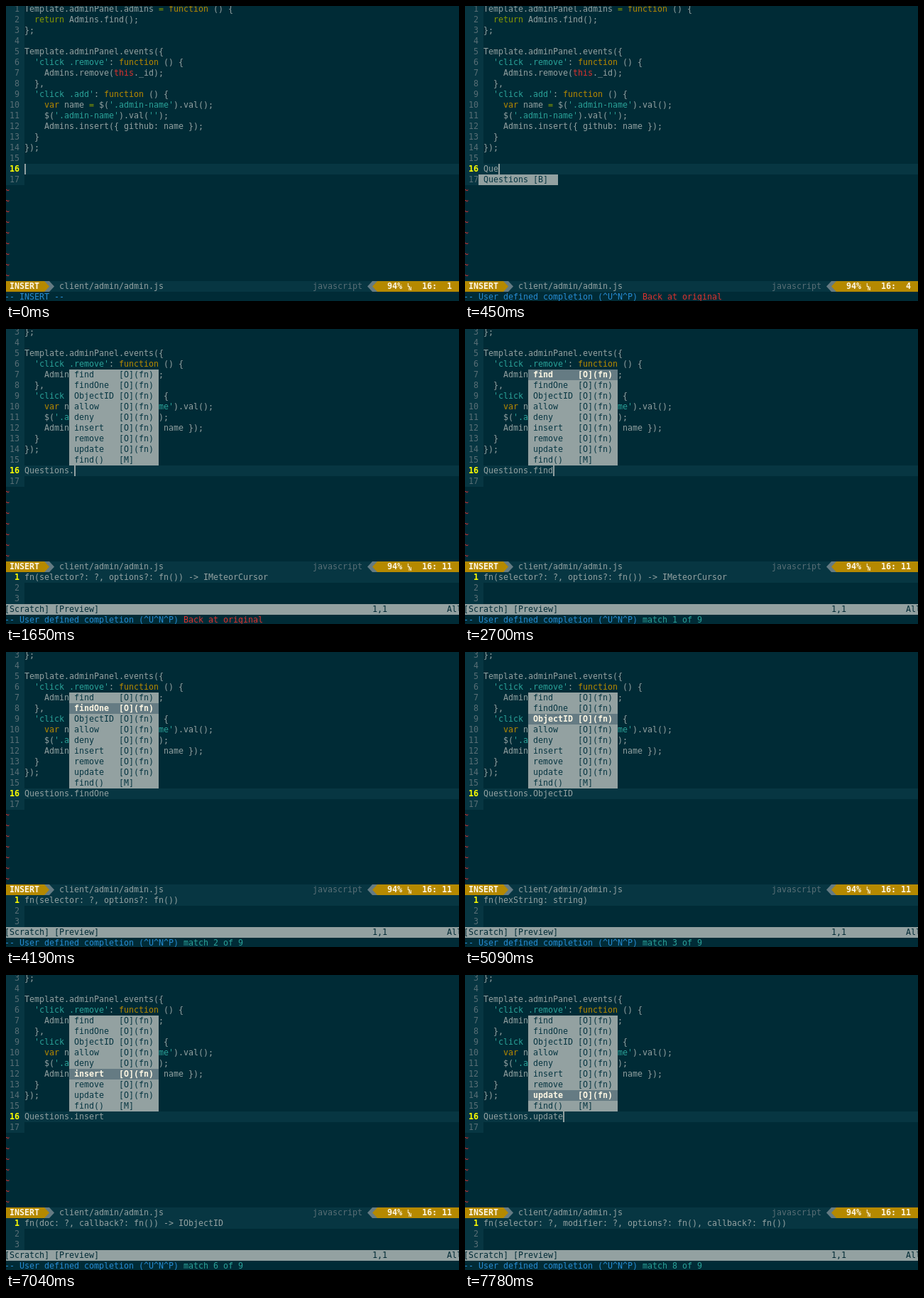
An HTML page with a canvas that plays this animation: 638 by 415 pixels, repeating every 8000 ms.

```html
<!DOCTYPE html>
<html lang="en">
<head>
<meta charset="utf-8">
<title>Code completion in an editor</title>
<style>
html, body { margin: 0; width: 100%; height: 100%; overflow: hidden; background: #002b36; }
canvas { display: block; }
</style>
</head>
<body>
<canvas id="stage" width="638" height="415"></canvas>
<script>
const ctx = document.getElementById('stage').getContext('2d');
const W = 638, ROW = 15, COL = 7, LEFT = -2, GUTTER = 26, LOOP = 8000;
const FONT = '"DejaVu Sans Mono", monospace';
const C = {
  bg: '#002b36', band: '#073642', text: '#93a1a1', dim: '#586e75', slate: '#657b83',
  gold: '#b58900', green: '#859900', cyan: '#2aa198', blue: '#268bd2', red: '#dc322f',
  yellow: '#ffff00', white: '#fdf6e3'
};

const CODE = `Template.adminPanel.admins = function () {
  return Admins.find();
};

Template.adminPanel.events({
  'click .remove': function () {
    Admins.remove(this._id);
  },
  'click .add': function () {
    var name = $('.admin-name').val();
    $('.admin-name').val('');
    Admins.insert({ github: name });
  }
});`.split('\n');
const CURRENT = 16, LAST = 17;

const TOKEN = /'[^']*'|\b(?:function|var|return|this)\b|=/;
const TOKEN_COLOR = { function: C.gold, var: C.gold, return: C.green, '=': C.green, this: C.red };

const SELECTOR = 'fn(selector: ?, ';
const RULE = 'fn(options: fn()) -> bool';
const ITEMS = [
  ['find', 'fn(selector?: ?, options?: fn()) -> IMeteorCursor'],
  ['findOne', SELECTOR + 'options?: fn())'],
  ['ObjectID', 'fn(hexString: string)'],
  ['allow', RULE],
  ['deny', RULE],
  ['insert', 'fn(doc: ?, callback?: fn()) -> IObjectID'],
  ['remove', SELECTOR + 'callback?: fn())'],
  ['update', SELECTOR + 'modifier: ?, options?: fn(), callback?: fn())'],
  ['find()', '']
];

// [start time, letters typed] and [start time, selected item]
const TYPING = [[0, 0], [150, 1], [300, 2], [450, 3], [600, 5], [900, 7], [1200, 9], [1650, 10]];
const PICKS = [[0, -1], [2700, 0], [3590, 1], [4490, 2], [5390, 3], [5990, 4], [6290, 5], [7340, 6], [7780, 7]];
const CURSOR_OFF = [[2400, 2550], [3300, 3440], [4190, 4490], [5090, 5390], [7040, 7340]];
const MENU_AT = 300, MEMBERS_AT = 1650;

const valueAt = (steps, t) => steps.filter(([start]) => start <= t).pop()[1];
const colX = col => LEFT + col * COL;

function rect(x, y, w, h, color) {
  ctx.fillStyle = color;
  ctx.fillRect(x, y, w, h);
}

function text(str, x, top, color, bold = false, size = 11.63) {
  ctx.font = `${bold ? 'bold ' : ''}${size}px ${FONT}`;
  ctx.fillStyle = color;
  ctx.fillText(str, x, top + 11);
}

function arrow(baseX, tipX, y, color) {
  ctx.fillStyle = color;
  ctx.beginPath();
  ctx.moveTo(baseX, y);
  ctx.lineTo(tipX, y + ROW / 2);
  ctx.lineTo(baseX, y + ROW);
  ctx.fill();
}

function codeLine(line, x, y) {
  for (const part of line.split(new RegExp(`(${TOKEN.source})`))) {
    const color = part[0] === "'" ? C.cyan : TOKEN_COLOR[part] || C.text;
    text(part, x, y, color);
    x += part.length * COL;
  }
}

function numberedLine(n, y, current) {
  rect(0, y, current ? W : GUTTER, ROW, C.band);
  text(String(n).padStart(2), colX(1), y, current ? C.yellow : C.dim, current);
}

function buffer(typed, firstLine, statusY) {
  const top = n => (n - firstLine) * ROW - 3;
  for (let n = firstLine; n <= LAST; n++) {
    numberedLine(n, top(n), n === CURRENT);
    codeLine(n === CURRENT ? typed : CODE[n - 1] || '', GUTTER, top(n));
  }
  for (let y = top(LAST + 1); y < statusY; y += ROW) text('~', LEFT, y, C.red);
  return top(CURRENT);
}

function statusBar(y, column) {
  rect(0, y, W, ROW, C.band);
  rect(0, y, 61, ROW, C.slate);
  arrow(61, 68, y, C.slate);
  rect(0, y, 54, ROW, C.gold);
  arrow(54, 61, y, C.gold);
  text('INSERT', colX(1), y, C.white, true);
  text('client/admin/admin.js', colX(11), y, C.text);
  text('javascript', colX(62), y, C.dim);
  arrow(516, 509, y, C.slate);
  rect(516, y, W - 516, ROW, C.slate);
  arrow(523, 516, y, C.gold);
  rect(523, y, W - 523, ROW, C.gold);
  text('94%', colX(77), y, C.white, true);
  text('L', 565, y - 3, C.white, true, 7);
  text('N', 567, y + 2, C.white, true, 7);
  text('16:' + String(column).padStart(3), colX(84), y, C.white, true);
}

function preview(signature) {
  for (let n = 1; n <= 3; n++) numberedLine(n, 327 + n * ROW, n === 1);
  text(signature, GUTTER, 342, C.text);
  rect(0, 387, W, ROW, C.text);
  text('[Scratch] [Preview]', LEFT, 387, C.bg);
  text('1,1', colX(74), 387, C.bg);
  text('All', colX(89), 387, C.bg);
}

function menu(rows, x, y, width, picked) {
  rows.forEach((row, i) => {
    const on = i === picked, top = y + i * ROW;
    rect(x, top, width, ROW, on ? C.slate : C.text);
    text(row, x + COL, top, on ? C.white : C.band, on);
  });
}

function commandLine(t, pick) {
  if (t < MENU_AT) return text('-- INSERT --', LEFT, 402, C.blue);
  text('-- User defined completion (^U^N^P)', LEFT, 402, C.blue);
  if (pick < 0) text('Back at original', colX(36), 402, C.red);
  else text(`match ${pick + 1} of ${ITEMS.length}`, colX(36), 402, C.cyan);
}

function draw(t) {
  const members = t >= MEMBERS_AT;
  const count = valueAt(TYPING, t);
  const pick = valueAt(PICKS, t);
  const typed = 'Questions.'.slice(0, count) + (pick < 0 ? '' : ITEMS[pick][0]);
  const statusY = members ? 327 : 387;

  rect(0, 0, W, 415, C.bg);
  const y = buffer(typed, members ? 3 : 1, statusY);
  statusBar(statusY, count + 1);

  if (members) {
    preview(ITEMS[Math.max(pick, 0)][1]);
    const rows = ITEMS.map(([name]) => name.padEnd(9) + (name.endsWith(')') ? '[M]' : '[O](fn)'));
    menu(rows, 89, 57, 126, pick);
  } else if (t >= MENU_AT) {
    menu(['Questions [B]'], 19, y + ROW, 112, -1);
  }

  commandLine(t, pick);
  const hidden = CURSOR_OFF.some(([from, to]) => t >= from && t < to);
  if (!hidden) rect(GUTTER + typed.length * COL, y, 2, ROW, C.text);
}

const start = performance.now();
function tick() {
  draw((performance.now() - start) % LOOP);
  requestAnimationFrame(tick);
}
tick();
</script>
</body>
</html>
```
